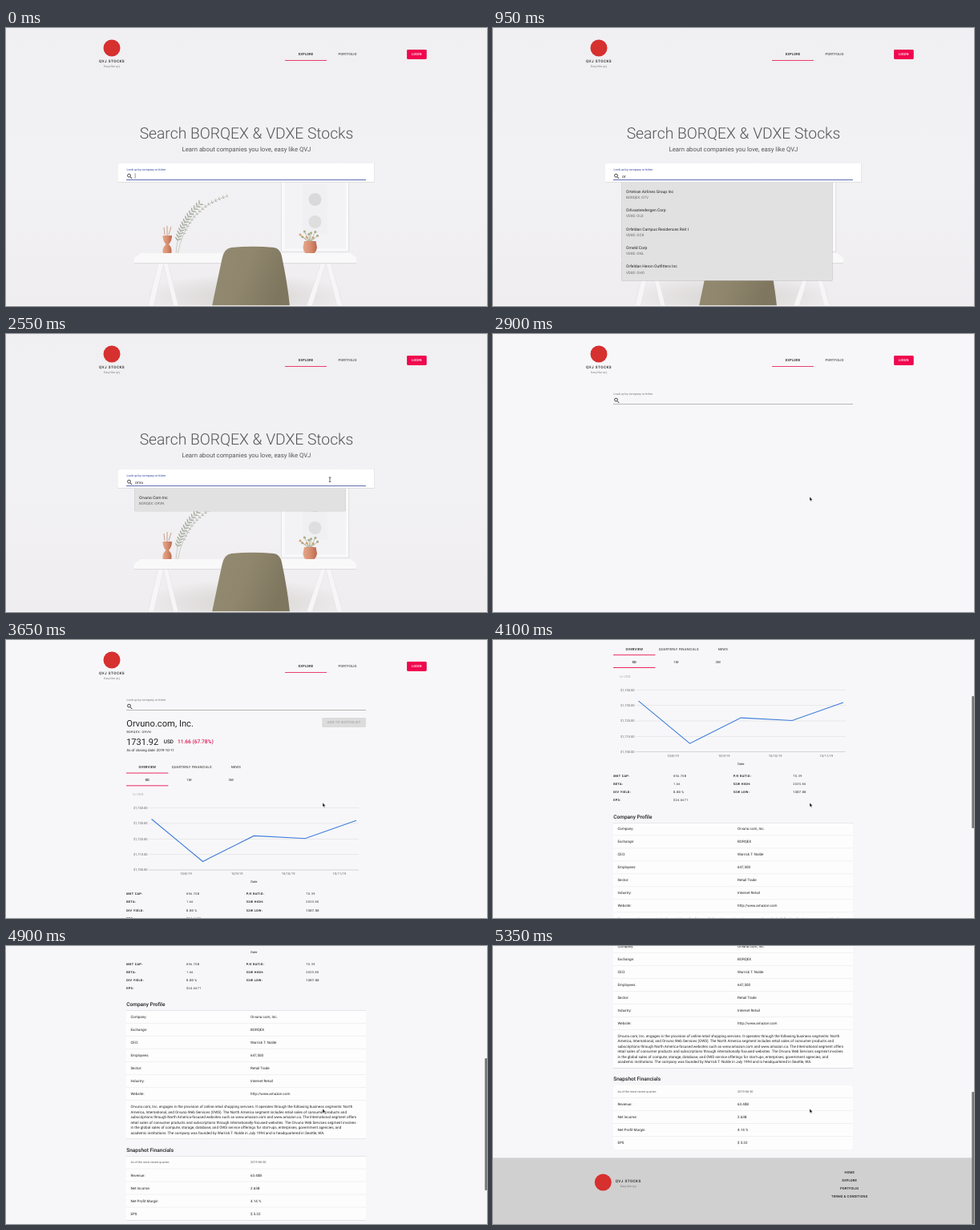
An HTML page for the animation above (5400 ms loop, 600 px wide and 347 px high).

```html
<!DOCTYPE html>
<html lang="en">
<head>
<meta charset="utf-8">
<title>Stock search</title>
<style>
html, body { margin: 0; width: 100%; height: 100%; overflow: hidden; background: #f7f7f9; }
svg { display: block; width: 100vw; height: 100vh; }
text { font-family: Roboto, "Liberation Sans", sans-serif; text-rendering: geometricPrecision; white-space: pre; }
.card { filter: drop-shadow(0 .6px .7px rgba(0, 0, 0, .42)); }
</style>
</head>
<body>
<svg id="stage" viewBox="0 0 600 347" preserveAspectRatio="none">
  <defs>
    <linearGradient id="wall" x2="0" y2="1">
      <stop offset="0" stop-color="#f0eff1"/><stop offset=".55" stop-color="#f2f1f3"/><stop offset="1" stop-color="#efedef"/>
    </linearGradient>
    <radialGradient id="shade" cx=".5" cy=".8" r=".55">
      <stop offset="0" stop-color="#d8d4d3"/><stop offset=".5" stop-color="#e2dfdf"/><stop offset="1" stop-color="#e2dfdf" stop-opacity="0"/>
    </radialGradient>
    <linearGradient id="leather" x2="1" y2=".3">
      <stop offset="0" stop-color="#938a72"/><stop offset=".5" stop-color="#8f866d"/><stop offset="1" stop-color="#7f765f"/>
    </linearGradient>
    <linearGradient id="copper" x2="1" y2="0">
      <stop offset="0" stop-color="#e3a78c"/><stop offset=".5" stop-color="#d98e70"/><stop offset="1" stop-color="#b9694f"/>
    </linearGradient>
  </defs>
  <g id="landing"></g>
  <g id="results"></g>
  <rect id="thumb" x="597.3" width="2.7" rx="1" fill="#777"/>
  <path id="beam" d="M-1.3-3Q0-3 0-2Q0-3 1.3-3M0-2V2M-1.3 3Q0 3 0 2Q0 3 1.3 3" fill="none" stroke="#222" stroke-width=".7"/>
  <path id="arrow" d="M0 0V5L1.2 4L2 5.8L2.9 5.4L2.1 3.7H3.6Z" fill="#111" stroke="#fff" stroke-width=".35"/>
</svg>
<script>
const LOOP = 5400, STAGE_H = 347, PAGE_H = 730;
const BRAND = "QVJ", COMPANY = "Orvuno.com, Inc.", MARKET_A = "BORQEX", MARKET_B = "VDXE";
const PINK = "#e9124f", INDIGO = "#303f9f", INK = "#222";
const $ = id => document.getElementById(id);

// y is the middle of the capital letters
function label(x, y, str, size, { fill = INK, weight = 400, anchor = "start", spacing = 0 } = {}) {
  const safe = str.replace(/&/g, "&amp;");
  return `<text x="${x}" y="${y + size * .355}" font-size="${size}" fill="${fill}" font-weight="${weight}" text-anchor="${anchor}" letter-spacing="${spacing}">${safe}</text>`;
}
const rect = (x, y, w, h, fill, extra = "") => `<rect x="${x}" y="${y}" width="${w}" height="${h}" fill="${fill}" ${extra}/>`;
const path = (d, stroke, width, fill = "none") => `<path d="${d}" fill="${fill}" stroke="${stroke}" stroke-width="${width}"/>`;
const disc = (x, y, r, fill) => `<circle cx="${x}" cy="${y}" r="${r}" fill="${fill}"/>`;
const caps = (x, y, str, fill = INK) => label(x, y, str, 4.2, { fill, weight: 500, anchor: "middle", spacing: .12 });
const card = (y, h) => rect(150, y, 299, h, "#fdfdfd", 'rx="1" class="card"');
const divider = y => rect(150, y, 299, .4, "#dedede");

function brand(x, y) {
  return label(x, y, `${BRAND} STOCKS`, 4.6, { weight: 500, anchor: "middle", spacing: .5 }) +
    label(x, y + 6.4, `Easy like ${BRAND.toLowerCase()}`, 3.3, { fill: "#666", anchor: "middle", spacing: .15 });
}

function header() {
  return disc(132, 25, 10.5, "#d6302f") + brand(132, 41.2) +
    caps(374, 32.7, "EXPLORE") + caps(426, 32.7, "PORTFOLIO", "#555") +
    rect(348, 40, 52, .8, PINK) +
    rect(500.2, 27, 24.4, 11.9, "#f1074f", 'rx="1.4" class="card"') + caps(512.3, 33, "LOGIN", "#fff");
}

function searchField(y, color, width) {
  return label(150.4, y, "Look up by company or ticker", 3.75, { fill: color }) +
    `<circle cx="153.5" cy="${y + 7.4}" r="1.9" fill="none" stroke="#222" stroke-width=".85"/>` +
    path(`M155 ${y + 9}L157.3 ${y + 11.3}`, "#222", 1) +
    rect(150, y + 12.5, 299, width, color);
}

// leaves grow in pairs along a quadratic curve
function branch([x, y], [bendX, bendY], [tipX, tipY], pairs, length) {
  let out = path(`M${x} ${y}Q${bendX} ${bendY} ${tipX} ${tipY}`, "#a3a99b", .5);
  for (let i = 0; i <= pairs; i++) {
    const u = .25 + .75 * i / pairs, v = 1 - u;
    const px = v * v * x + 2 * u * v * bendX + u * u * tipX;
    const py = v * v * y + 2 * u * v * bendY + u * u * tipY;
    const slope = Math.atan2(v * (bendY - y) + u * (tipY - bendY), v * (bendX - x) + u * (tipX - bendX)) * 180 / Math.PI;
    for (const side of [-1, 1])
      out += `<ellipse cx="${length}" rx="${length}" ry="${length * .3}" fill="#a4ab9d" transform="translate(${px} ${py}) rotate(${slope + side * 48})"/>`;
  }
  return out;
}

function room() {
  let out = rect(0, 0, 600, 347, "url(#wall)");
  out += rect(343.7, 190, 84, 89, "#fafafb", 'stroke="#d9d8da" stroke-width=".7"') +
    rect(347.5, 190, 76.5, 85.5, "#f3f2f4") +
    rect(370, 195, 31, 62, "#f0eff1") + disc(385.5, 214, 8, "#d9d9dc") + disc(385.5, 242, 8, "#dededf");
  out += branch([212, 283], [213, 246], [241, 220], 13, 2.6) + branch([214, 283], [224, 226], [275, 210], 15, 1.4);
  out += path("M195.5 259H207Q207 266 203 270Q208 275 206 282H196Q194 275 199.5 270Q195.5 266 195.5 259Z", "none", 0, "url(#copper)") +
    path("M201 259V247M198 258L197 249M203 258L206 248", "#b77d5f", .7);
  for (let i = 0; i < 9; i++) {
    const x = 367 + i * 2.7, y = 258 + 4 * Math.sin(i * 2.4);
    out += path(`M379 268L${x} ${y}`, "#8f9b73", .6) + disc(x, y, 1.5, i % 3 ? "#a4ad86" : "#dda06f");
  }
  out += path("M372 266H386.5L388 274Q387 280 383 282H375Q371 280 370.5 274Z", "none", 0, "url(#copper)");
  out += rect(178, 293, 240, 54, "url(#shade)");
  out += path("M190 293H197L184 347H177ZM196 293H202L215 347H209Z", "#dddadd", .4, "#f7f6f7") +
    path("M393 293H399L382 347H375ZM399 293H405L420 347H413Z", "#dddadd", .4, "#f7f6f7");
  out += path("M168 281H430L437 287V293.5H160V287Z", "none", 0, "#faf9fa") + rect(160, 293.2, 277, .9, "#dad7da");
  out += path("M257 347Q263 318 269.5 288Q271.5 275.5 281 274Q308 271.5 334 274Q342 275 344 285Q351 318 354 347Z", "none", 0, "url(#leather)");
  return out + rect(0, 346.2, 600, .8, "#fafafa");
}

const matches = [
  ["Ortelvan Airlines Group Inc", `${MARKET_A}: OTV`],
  ["Orlivastendergen Corp", `${MARKET_B}: OLS`],
  ["Orfeldan Campus Residences Reit I", `${MARKET_B}: OCR`],
  ["Orneld Corp", `${MARKET_B}: ONL`],
  ["Orfeldan Heron Outfitters Inc", `${MARKET_B}: OHO`]
];
const exact = [["Orvuno Com Inc", `${MARKET_A}: ORVN`]];

function dropdown(id, list) {
  const rows = list.map(([name, ticker], i) =>
    label(166, 203.9 + i * 23.45, name, 5) +
    label(166, 211.2 + i * 23.45, ticker, 4.5, { fill: "#666" })).join("");
  return `<g id="${id}">${rect(160.7, 193, 262.6, 4.6 + list.length * 23.55, "#e2e1e2", 'class="card"')}${rows}</g>`;
}

function landing() {
  const centred = { anchor: "middle", fill: "#555" };
  return room() + header() +
    label(300, 131, `Search ${MARKET_A} & ${MARKET_B} Stocks`, 19.3, { ...centred, weight: 300 }) +
    label(300, 150.8, `Learn about companies you love, easy like ${BRAND}`, 7.75, centred) +
    dropdown("many", matches) + dropdown("one", exact) +
    rect(140, 169, 319.7, 23.5, "#fff", 'rx="1" class="card"') +
    searchField(176.8, INDIGO, .8) +
    `<text id="query" x="161" y="186.7" font-size="5.1" fill="${INK}"></text>` +
    rect(160.8, 181.3, .5, 6.7, "#333", 'id="caret"');
}

function chart() {
  const grey = { fill: "#666" };
  let out = label(158.3, 192.7, "In USD", 4.2, { fill: "#aaa", spacing: .15 });
  for (let i = 0; i < 5; i++) {
    const y = 209.6 + i * 19.35;
    out += rect(178, y - .2, 262, .45, i == 4 ? "#aaa" : "#d6d6d6") +
      label(176.5, y, `$1,${740 - i * 10}.00`, 4, { ...grey, anchor: "end" });
  }
  for (let i = 0; i < 4; i++)
    out += label(224.5 + i * 63.8, 291.6, `10/${8 + i}/19`, 4, { ...grey, anchor: "middle" });
  return out + label(309.3, 302, "Date", 4, { anchor: "middle" }) +
    path("M181.5 223.5L245.5 276.5L309.3 244.4L373.2 247.8L437 225.3", "#3f7ddb", 1.1);
}

function stats() {
  const rows = [
    ["MKT CAP:", "856.70B", "P/E RATIO:", "70.39"],
    ["BETA:", "1.66", "52W HIGH:", "2035.80"],
    ["DIV YIELD:", "0.00 %", "52W LOW:", "1307.00"],
    ["EPS:", "$24.6671"]
  ];
  const columns = [150.3, 225, 299.7, 374.3];
  return rows.map((row, r) => row.map((str, c) =>
    label(columns[c], 317 + r * 10.15, str, 3.75, { weight: c % 2 ? (r == 2 ? 500 : 400) : 700, spacing: .38 })).join("")).join("");
}

const table = (top, rows) => rows.map(([name, value], i) =>
  label(155.4, top + i * 16, name, 4.5) + label(305, top + i * 16, value, 4.5)).join("");

function profile() {
  const about = [
    `${COMPANY} engages in the provision of online retail shopping services. It operates through the following business segments: North`,
    "America, International, and Orvuno Web Services (OWS). The North America segment includes retail sales of consumer products and",
    "subscriptions through North America-focused websites such as www.amazon.com and www.amazon.ca. The International segment offers",
    "retail sales of consumer products and subscriptions through internationally-focused websites. The Orvuno Web Services segment involves",
    "in the global sales of compute, storage, database, and OWS service offerings for start-ups, enterprises, government agencies, and",
    "academic institutions. The company was founded by Warrick T. Nolde in July 1994 and is headquartered in Seattle, WA."
  ];
  let out = label(150.3, 367.8, "Company Profile", 6.5, { weight: 500 }) + card(375.5, 160);
  for (let i = 0; i < 7; i++) out += divider(391 + i * 16);
  out += table(383.2, [
    ["Company:", COMPANY], ["Exchange:", MARKET_A], ["CEO:", "Warrick T. Nolde"], ["Employees:", "647,500"],
    ["Sector:", "Retail Trade"], ["Industry:", "Internet Retail"], ["Website:", "http://www.amazon.com"]
  ]);
  return out + about.map((line, i) => label(155.4, 495.2 + i * 6.5, line, 4.6)).join("");
}

function financials() {
  const small = { fill: "#555", spacing: .03 };
  let out = label(150.3, 549, "Snapshot Financials", 6.5, { weight: 500 }) + card(557, 80);
  for (let i = 0; i < 4; i++) out += divider(572.5 + i * 16);
  return out + label(155.4, 564.5, "As of the most recent quarter:", 3.6, small) + label(305, 564.5, "2019-06-30", 3.8, small) +
    table(580.7, [["Revenue:", "63.40B"], ["Net Income:", "2.63B"], ["Net Profit Margin", "4.14 %"], ["EPS", "$ 5.32"]]);
}

function footer() {
  const links = ["HOME", "EXPLORE", "PORTFOLIO", "TERMS & CONDITIONS"];
  return rect(0, 647.4, 600, 83, "#d1d0d1") + disc(137.3, 678, 10.5, "#d6302f") + brand(168.7, 676.3) +
    links.map((str, i) => caps(444.7, 665.5 + i * 10.15, str)).join("");
}

function results() {
  const summary =
    label(150.2, 103.6, COMPANY, 11.2) +
    label(150.4, 115, `${MARKET_A}: ORVN`, 3.75, { spacing: .38 }) +
    label(150.2, 127.4, "1731.92", 11) +
    label(196.8, 127, "USD", 6.4, { weight: 500 }) +
    label(214, 127, "11.66 (67.78%)", 6.6, { weight: 500, fill: "#dc1550" }) +
    label(150.4, 137.4, "As of closing date: 2019-10-11", 4.4) +
    rect(394.3, 97, 54.7, 12, "#dcdcdd", 'rx="1.4"') +
    label(421.7, 103, "ADD TO WATCHLIST", 4.2, { weight: 500, fill: "#a6a6a6", anchor: "middle", spacing: .2 });
  const tabs =
    caps(176.3, 158.7, "OVERVIEW") + caps(231.7, 158.7, "QUARTERLY FINANCIALS", "#555") + caps(286.8, 158.7, "NEWS", "#555") +
    caps(176.3, 174.4, "5D") + caps(228.5, 174.4, "1M", "#555") + caps(280.7, 174.4, "3M", "#555") +
    rect(150, 165.6, 52.4, .9, PINK) + rect(150, 181.4, 52.4, .9, PINK);
  return rect(0, 0, 600, PAGE_H, "#f7f7f9") + header() + searchField(74.7, "#777", .5) +
    `<g id="details">${summary}${tabs}${chart()}${stats()}${profile()}${financials()}${footer()}</g>`;
}

$("landing").innerHTML = landing();
$("results").innerHTML = results();

const progress = (t, from, to) => Math.min(1, Math.max(0, (t - from) / (to - from)));
const smooth = u => u * u * (3 - 2 * u);
const show = (id, on) => $(id).setAttribute("visibility", on ? "inherit" : "hidden");

const keyTimes = [450, 750, 1500, 1900];
const OPENED = 2900, LOADED = 3050;

function scrollAt(t) {
  return 292 * smooth(progress(t, 3700, 4600) ** .85) + 91 * smooth(progress(t, 4850, 5350));
}

function draw(t) {
  const typed = keyTimes.filter(k => t >= k).length;
  const opened = t >= OPENED;
  show("landing", !opened);
  show("results", opened);
  show("details", opened && t >= LOADED);

  $("query").textContent = "orvu".slice(0, typed);
  show("caret", !opened && !typed);
  show("many", !opened && t >= 650 && t < 2050);
  show("one", !opened && t >= 2050);

  const y = scrollAt(t);
  $("results").setAttribute("transform", `translate(0 ${-y})`);
  $("thumb").setAttribute("y", y * STAGE_H / PAGE_H);
  $("thumb").setAttribute("height", STAGE_H * STAGE_H / PAGE_H);
  show("thumb", y > 0);

  const move = smooth(progress(t, 2550, 2750));
  const px = 404 - 9 * move, py = 181.7 + 21.5 * move;
  const overField = py < 193;
  for (const id of ["beam", "arrow"]) $(id).setAttribute("transform", `translate(${px} ${py})`);
  show("beam", t >= 2350 && overField);
  show("arrow", !overField);
}

function tick(now) {
  draw(now % LOOP);
  requestAnimationFrame(tick);
}
draw(0);
requestAnimationFrame(tick);
</script>
</body>
</html>
```
